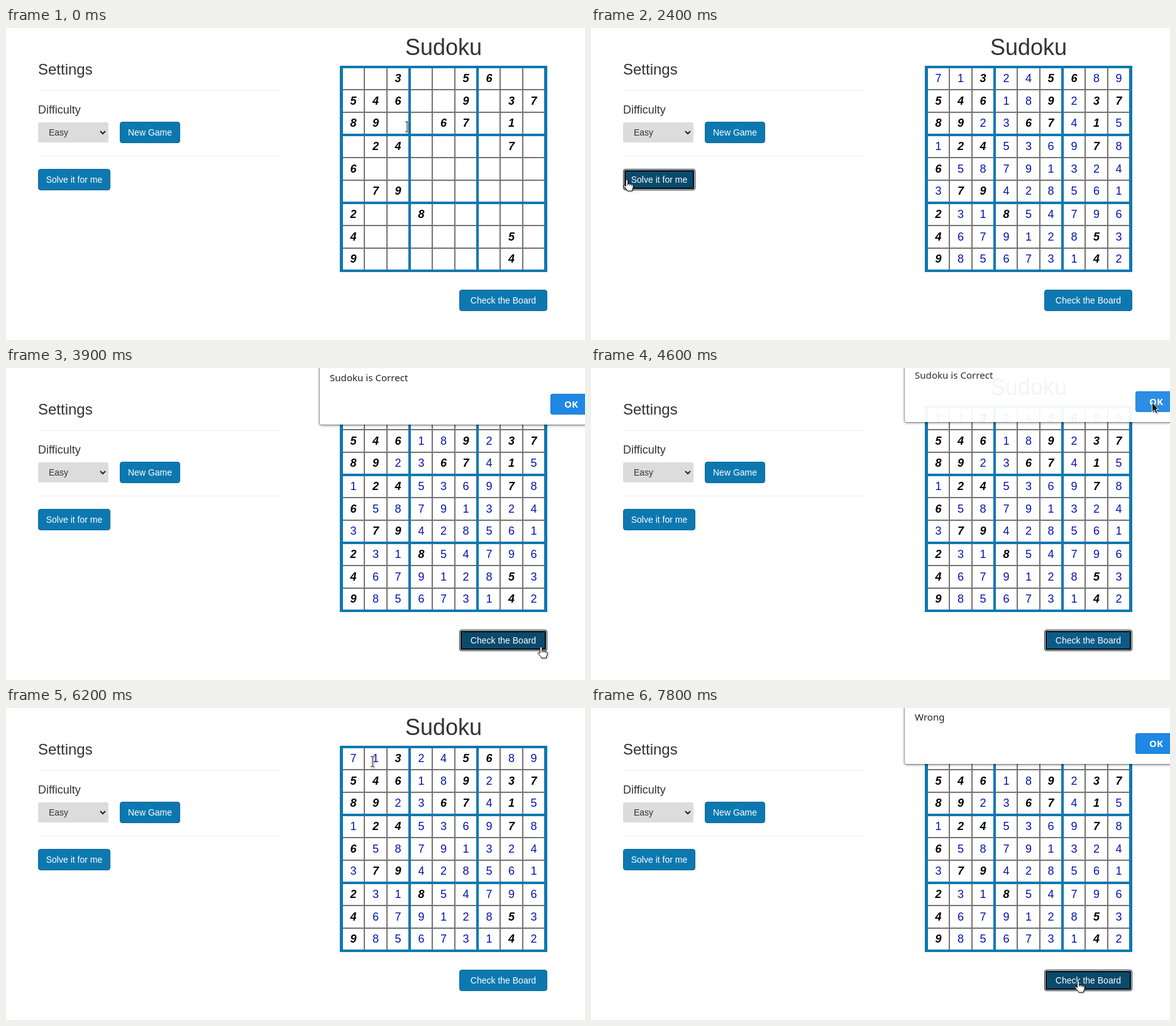
Animation, 921 px wide and 496 px high, one loop 8 s. Source, as an HTML page:

```html
<!DOCTYPE html>
<html lang="en">
<head>
<meta charset="utf-8">
<title>Sudoku</title>
<style>
html, body { margin: 0; width: 100%; height: 100%; overflow: hidden; background: #fff; }
#stage { position: relative; width: 921px; height: 496px; overflow: hidden;
  font: 14px/20px "Liberation Sans", Arial, sans-serif; color: #333; }
#stage div, #stage svg { position: absolute; box-sizing: border-box; white-space: nowrap; }
.hr { left: 51px; width: 384px; height: 1px; background: #eee; }
.btn { height: 34px; padding: 6px 0; text-align: center; color: #fff; border-radius: 4px;
  background: #0d78b0; border: 1px solid #0b6798; }
.btn.hover, .btn.focus { background: #0b5b88; border-color: #094a6d; }
.btn.active { background: #0a4a6c; border-color: #083a55; }
.btn.focus, .btn.active { border-color: #06202e; box-shadow: inset 0 0 0 1px #fff, inset 0 0 0 3px #000; }
#board { left: 531px; top: 60px; width: 330px; height: 328px; background: #0d78b0; }
.block { width: 104px; height: 104px; background: #747474; }
.cell { background: #fff; text-align: center; font-size: 18px; color: #0014ae; }
.given { font-weight: bold; font-style: italic; color: #000; }
#caret { width: 1px; height: 20px; background: #000; }
#dialog { left: 499px; top: -60px; width: 480px; height: 150px; background: #fff; border-radius: 3px;
  box-shadow: 0 0 0 1px rgba(0,0,0,.22), 0 1px 4px rgba(0,0,0,.55); }
#message { left: 16px; top: 65px; font: 15.1px/20px "Noto Sans", sans-serif; color: #222; }
#ok { left: 367px; top: 101px; width: 66px; height: 33px; border-radius: 3px; background: #1f88e5;
  border: 1px solid #1a7bd2; font: bold 15px/31px "Noto Sans", sans-serif; color: #fff; text-align: center; }
#pointer { left: 0; top: 0; overflow: visible; filter: drop-shadow(1px 1px 1px rgba(0,0,0,.35)); }
</style>
</head>
<body>
<div id="stage">
  <div style="left:51px;top:52px;font-size:24px;line-height:27px">Settings</div>
  <div class="hr" style="top:99px"></div>
  <div style="left:51px;top:120px;font-size:18px">Difficulty</div>
  <div style="left:51px;top:150px;width:112px;height:32px;padding:6px 17px;background:#dcdcdc;border-radius:3px">Easy</div>
  <svg style="left:149px;top:162px" width="10" height="8"><path d="M1 2l4 4 4-4" fill="none" stroke="#222" stroke-width="2"/></svg>
  <div class="btn" style="left:181px;top:149px;width:96px">New Game</div>
  <div class="hr" style="top:203px"></div>
  <div class="btn" id="solve" style="left:51px;top:224px;width:115px">Solve it for me</div>
  <div style="left:531px;top:10px;width:330px;text-align:center;font-size:36px;line-height:41px">Sudoku</div>
  <div id="board"></div>
  <div class="btn" id="check" style="left:721px;top:416px;width:140px">Check the Board</div>
  <div id="caret"></div>
  <div id="dialog"><div id="message"></div><div id="ok">OK</div></div>
  <svg id="pointer" width="1" height="1">
    <g id="arrow"><path d="M.5 .5V16L4 12.8 6.4 18.2 9 17 6.7 11.8H11Z" fill="#111" stroke="#fff"/></g>
    <g id="beam" fill="none">
      <path d="M-3 -8h2.5l.5 .5.5 -.5H3M0 -8V8M-3 8h2.5l.5 -.5.5 .5H3" stroke="#fff" stroke-width="2.6"/>
      <path d="M-3 -8h2.5l.5 .5.5 -.5H3M0 -8V8M-3 8h2.5l.5 -.5.5 .5H3" stroke="#111"/>
    </g>
    <g id="hand" fill="#fff" stroke="#111" stroke-linejoin="round">
      <path d="M-1.5 1Q0 -1 1.5 1V7Q3 5.5 4.3 7.2 6 6 7.2 7.8 9 7 10 9V13L8.5 16V18H.5V16.5L-5 10.5Q-4.5 8 -1.5 10.5Z"/>
      <path d="M1.5 7V9M4.4 7.5V9.5M7.2 8V10" fill="none"/>
    </g>
  </svg>
</div>
<script>
const $ = id => document.getElementById(id);
const solution = '713245689546189237892367415124536978658791324379428561231854796467912853985673142';
const givens = '..3..56..546..9.3789..67.1..24....7.6.........79......2..8.....4......5.9......4.';
const px = v => v + 'px';

function box(parent, cls, x, y, w, h) {
  const el = document.createElement('div');
  el.className = cls;
  Object.assign(el.style, { left: px(x), top: px(y), width: px(w), height: px(h) });
  return parent.appendChild(el);
}

// Start and size of a cell along one axis; the gaps are the grid lines.
const inset = i => i % 3 ? 1 : 2;
const start = i => 36 * i + inset(i);
const size = i => 36 - inset(i) - inset(i + 1);

for (let b = 0; b < 9; b++)
  box($('board'), 'block', 5 + 108 * (b % 3), 4 + 108 * Math.floor(b / 3), 104, 104).style.width = '104px';

const cells = [...solution].map((_, i) => {
  const c = i % 9, r = Math.floor(i / 9);
  const el = box($('board'), givens[i] === '.' ? 'cell' : 'cell given',
    3 + start(c), 2 + start(r), size(c), size(r));
  el.style.paddingTop = px(Math.floor((size(r) - 20) / 2));
  return el;
});

// Pointer keys: time, x, y and the shape used from that time on
const track = [
  [0, 638, 157, 'beam'], [1300, 638, 157, 'beam'], [1500, 504, 184, 'arrow'], [1700, 371, 211, 'arrow'],
  [1900, 45, 238, 'arrow'], [2100, 45, 238, 'arrow'], [2200, 57, 241, 'hand'], [2800, 57, 241, 'hand'],
  [2900, 190, 262, 'arrow'], [3300, 870, 417, 'arrow'], [3400, 859, 434, 'hand'], [3500, 851, 443, 'hand'],
  [3900, 851, 443, 'hand'], [4000, 858, 390, 'arrow'], [4500, 892, 54, 'arrow'], [4700, 892, 54, 'arrow'],
  [5200, 690, 66, 'beam'], [5500, 602, 77, 'beam'], [5600, 602, 78, 'beam'], [5700, 602, 78, 'beam'],
  [5800, 592, 90, 'beam'], [5900, 583, 94, 'beam'], [6100, 583, 94, 'beam'], [6200, 583, 85, 'beam'],
  [6500, 583, 85, 'beam'], [6900, 745, 385, 'arrow'], [7000, 775, 442, 'hand'], [7500, 775, 442, 'hand'],
  [7800, 775, 434, 'hand']
];

// Each list holds [time, value...]; the latest entry applies.
const at = (list, t) => list.filter(k => k[0] <= t).pop();
const solveStates = [[0, ''], [2200, 'hover'], [2400, 'active'], [2500, 'focus'], [3600, '']];
const checkStates = [[0, ''], [3400, 'hover'], [3600, 'active'], [4600, 'focus'], [4800, ''], [7000, 'hover'], [7200, 'active']];
const carets = [[0, 0, 0], [400, 624, 142], [900, 0, 0], [1200, 629, 141], [1700, 0, 0],
  [6300, 592, 70], [6400, 588, 70], [6500, 592, 70], [7200, 0, 0]];
const edits = [[0, '1'], [6400, ''], [6500, '2']];
const dialogs = [[0, 0, 0], [3700, -5, .6], [3800, -1, .95], [3900, 0, 1], [4600, -4, .95], [4700, -9, .4],
  [4800, 0, 0], [7600, -8, .4], [7700, -4, .85], [7800, -1, 1]];

function pointer(t) {
  const key = at(track, t), next = track[track.indexOf(key) + 1] || key;
  const f = next === key ? 0 : (t - key[0]) / (next[0] - key[0]);
  const mix = n => Math.round(key[n] + (next[n] - key[n]) * f);
  $('pointer').style.transform = `translate(${mix(1)}px, ${mix(2)}px)`;
  for (const name of ['arrow', 'beam', 'hand'])
    $(name).style.display = key[3] === name ? '' : 'none';
}

function digit(i, t) {
  if (givens[i] !== '.') return givens[i];
  if (i === 20) return t >= 1200 ? '2' : '';
  if (t < 2400) return '';
  return i === 1 ? at(edits, t)[1] : solution[i];
}

let shown = -1;
function draw(t) {
  cells.forEach((el, i) => { el.textContent = digit(i, t); });
  $('solve').className = 'btn ' + at(solveStates, t)[1];
  $('check').className = 'btn ' + at(checkStates, t)[1];
  const [, cx, cy] = at(carets, t);
  Object.assign($('caret').style, { left: px(cx), top: px(cy), display: cx ? '' : 'none' });
  const [, shift, alpha] = at(dialogs, t);
  Object.assign($('dialog').style, { transform: `translateY(${shift}px)`, opacity: alpha });
  $('message').textContent = t < 6000 ? 'Sudoku is Correct' : 'Wrong';
  pointer(t);
}

function tick() {
  const t = Math.floor(performance.now() % 8000 / 100) * 100;
  if (t !== shown) draw(shown = t);
  requestAnimationFrame(tick);
}
tick();
</script>
</body>
</html>
```
